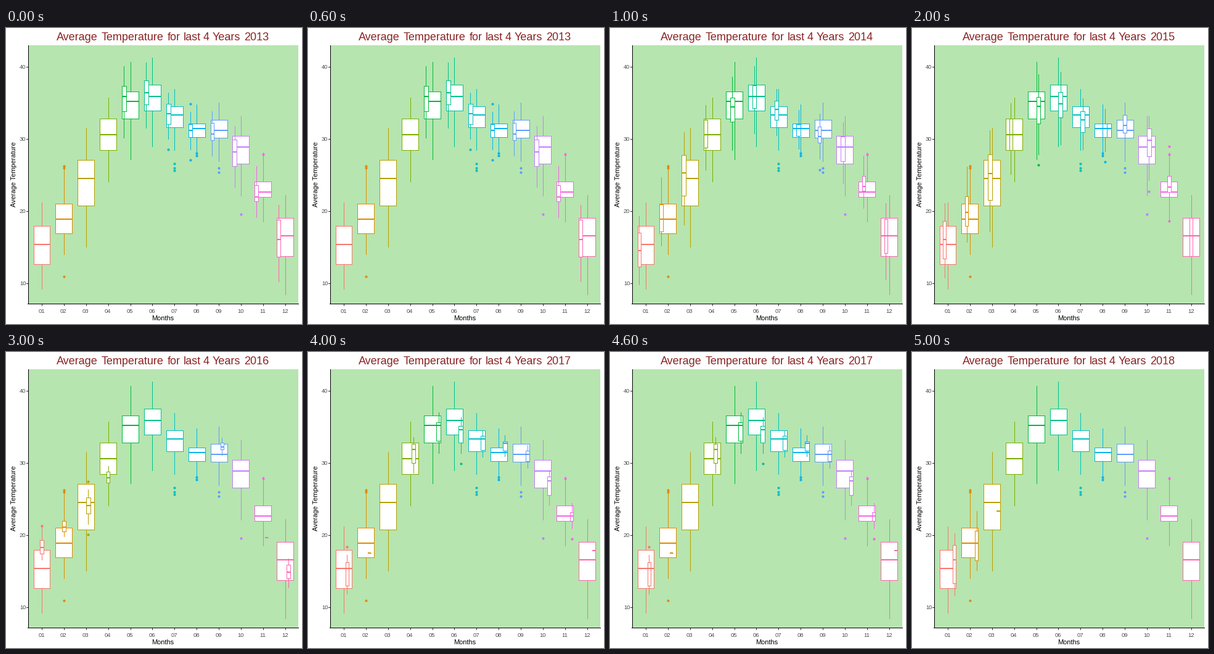
Animation of 480x480 px, one loop 6000 ms. Source, as a matplotlib script:

```python
from math import cos, pi

import matplotlib.pyplot as plt
from matplotlib.animation import ArtistAnimation
from matplotlib.patches import Rectangle

PT = 0.72  # points per pixel at 100 dpi
LEFT, RIGHT, TOP, BOTTOM = 36, 474, 29, 447
STEP = 35.88
BOX = 0.75 * STEP
MONTHS = range(1, 13)
TITLE = "#8B2323"
HUES = ["#F8766D", "#DE8C00", "#B79F00", "#7CAE00", "#00BA38", "#00C08B",
        "#00BFC4", "#00B4F0", "#619CFF", "#C77CFF", "#F564E3", "#FF64B0"]


def season(month, mean, *waves):
    """Yearly mean plus waves of (cycles per year, size, peak month)."""
    return mean + sum(size * cos(pi / 6 * n * (month - peak))
                      for n, size, peak in waves)


def climate(m):
    """Median, box height above and below it, whisker lengths, in degrees."""
    return (season(m, 27.03, (1, 9.35, 6.65), (2, 2.76, 4.22), (3, 0.86, 1.84)),
            season(m, 1.79, (1, 0.73, 1.8), (4, 0.37, 0.4)),
            season(m, 2.03, (1, 0.78, 2.7), (4, 0.49, 0.4), (5, 0.65, 0.4)),
            season(m, 3.36, (1, 0.86, 2.5), (3, 0.56, 2.2), (4, 0.72, 2.25)),
            season(m, 4.10, (1, 0.69, 3.5), (2, 0.89, 4.85),
                   (4, 0.73, 0.1), (5, 0.72, 0.4)))


def overall(m):
    med, up, down, above, below = climate(m)
    return med + up + above, med + up, med, med - down, med - down - below


# swing: size, period and peak month of the shift from the overall median;
# spread: box above, box below and whiskers relative to the overall box;
# single: months with one reading; odd: outlier months, negative if above
years = {
    2013: dict(months=range(5, 13), swing=(0.7, 12, 4.5),
               spread=(1.1, 0.85, 0.65), odd=(7, 8, -8)),
    2014: dict(months=MONTHS, swing=(0.8, 4, 3),
               spread=(0.95, 0.85, 0.7), odd=(9,)),
    2015: dict(months=MONTHS, swing=(1.0, 8, 2),
               spread=(1.0, 1.0, 0.75), odd=(5, 8, 10, 11, -11)),
    2016: dict(months=(1, 2, 3, 4, 9, 11, 12), swing=(3.0, 6.5, 1.25),
               spread=(0.4, 0.3, 0.25), odd=(-1, 3, -3), single=(11,)),
    2017: dict(months=(1, 2, *range(4, 13)), swing=(1.3, 4, 0),
               spread=(0.35, 0.9, 0.3), odd=(-1, 6, 11), single=(2, 12)),
    2018: dict(months=range(1, 5), swing=(1.2, 4, 1),
               spread=(0.8, 1.2, 0.5), odd=(), single=(3, 4)),
}
outliers = {2: (26.2, 26.0, 10.9), 7: (26.6, 26.0, 25.6), 8: (28.0, 27.7),
            9: (26.0, 25.4), 10: (19.6,), 11: (27.9,)}


def yearly(year, m):
    """Box values and outliers of one month in one year."""
    rule = years[year]
    size, period, peak = rule["swing"]
    wide, deep, reach = rule["spread"]
    med, up, down, above, below = climate(m)
    med += size * cos(2 * pi * (m - peak) / period)
    if m in rule.get("single", ()):
        return (med,) * 5, []
    q3, q1 = med + wide * up, med - deep * down
    top, *_, bottom = overall(m)
    high = max(q3, min(top, q3 + reach * above))
    low = min(q1, max(bottom, q1 - reach * below))
    odd = [low - 1.5] * (m in rule["odd"]) + [high + 1.2] * (-m in rule["odd"])
    return (high, q3, med, q1, low), odd


fig = plt.figure(figsize=(4.8, 4.8), dpi=100, facecolor="white")
plt.rcParams["font.family"] = "Liberation Sans"
ax = fig.add_axes([0, 0, 1, 1])
ax.set_xlim(0.5, 480.5)
ax.set_ylim(480.5, 0.5)
ax.axis("off")


def row(temp):
    return round(63 + (40 - temp) * 11.7)


def month_x(month):
    return LEFT + 0.5 + STEP * (month - 0.4)


def text(x, y, s, px, color="black", **kw):
    return ax.text(x, y, s, fontsize=px * PT, color=color, va="baseline",
                   zorder=5, **kw)


def line(xs, ys, color, px=1, z=2):
    return ax.plot(xs, ys, color=color, lw=px * PT, zorder=z,
                   solid_capstyle="butt", antialiased=False)[0]


def draw_box(month, stats, odd, x, width, z):
    """Outliers, whiskers, box and median; returns the artists."""
    high, q3, med, q1, low = map(row, stats)
    color = HUES[month - 1]
    x0, x1, xm = round(x - width / 2), round(x + width / 2), round(x)
    dots = ax.plot([xm] * len(odd), [row(t) for t in odd], "o", color=color,
                   ms=4.1 * PT, mew=0, zorder=z)
    whisker = line([xm, xm], [high - 0.5, low + 0.5], color, z=z)
    box = Rectangle((x0, q3), x1 - x0, q1 - q3, fc="white", ec=color,
                    lw=PT, zorder=z, joinstyle="miter", antialiased=False)
    ax.add_patch(box)
    return [*dots, whisker, box, line([x0, x1], [med, med], color, 2, z)]


def draw_year(year):
    parts = [text(386.8, 21, str(year), 18, TITLE)]
    for month in years[year]["months"]:
        group = [y for y in years if month in years[y]["months"]]
        width = BOX / len(group)
        x = month_x(month) - BOX / 2 + width * (group.index(year) + 0.5)
        parts += draw_box(month, *yearly(year, month), x, width, 3)
    return parts


# panel and axes
ax.add_patch(Rectangle((LEFT, TOP - 0.5), RIGHT - LEFT + 0.5,
                       BOTTOM - TOP + 0.5, fc="#B6E5AF", lw=0, zorder=0))
for temp in range(10, 50, 10):
    y = row(temp)
    line([33.5, LEFT], [y, y], "#333333")
    text(33, y + 3.5, str(temp), 9.5, "#4D4D4D", ha="right")
for month in MONTHS:
    x = month_x(month)
    line([round(x)] * 2, [BOTTOM, BOTTOM + 3.5], "#333333")
    text(x, 462, f"{month:02d}", 9.5, "#4D4D4D", ha="center")
line([LEFT, LEFT], [TOP - 0.5, BOTTOM + 0.5], "black")
line([LEFT - 0.5, RIGHT + 0.5], [BOTTOM, BOTTOM], "black")

# titles
words = "Average Temperature for last 4 Years".split()
for x, word in zip((82.5, 155, 262.6, 288, 320.5, 335.6), words):
    text(x, 21, word, 18, TITLE)
text(254.5, 475, "Months", 11, ha="center")
text(16.5, 237.5, "Average Temperature", 11, ha="center",
     rotation=90, rotation_mode="anchor")

for month in MONTHS:
    draw_box(month, overall(month), outliers.get(month, ()),
             month_x(month), BOX, 2)

anim = ArtistAnimation(fig, [draw_year(y) for y in years], interval=1000,
                       repeat=True, repeat_delay=0, blit=False)
plt.show()
```
